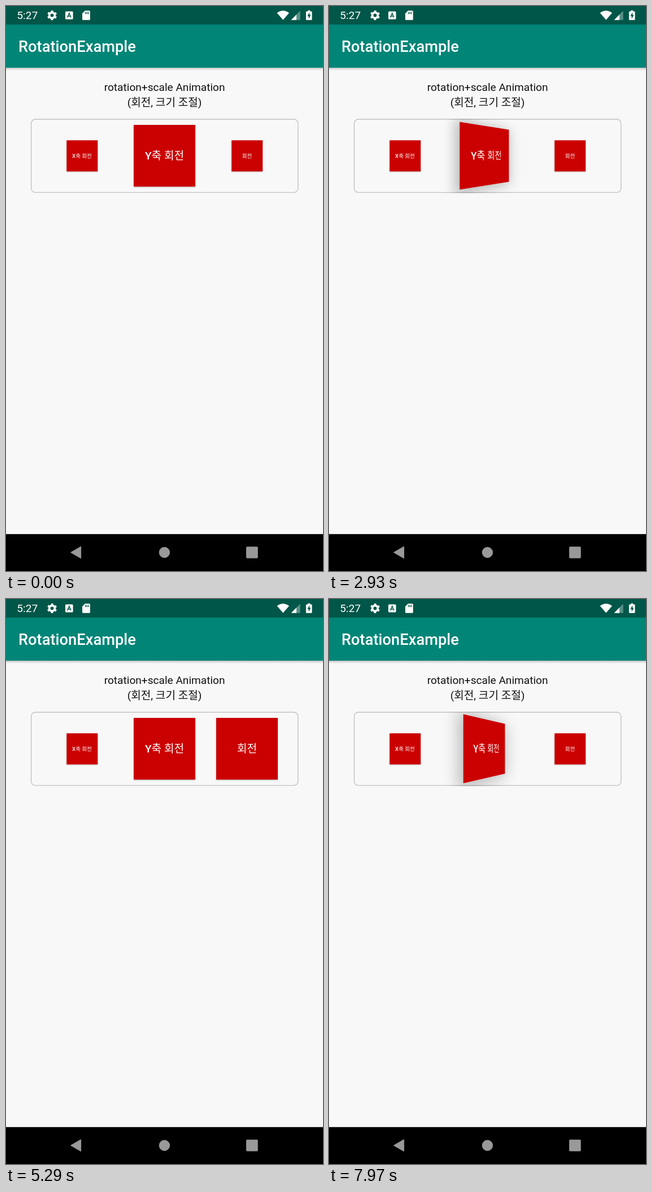
Recreate the animation shown at these times as an HTML page. Size 561 px wide and 998 px high, loop 8 s.

```html
<!DOCTYPE html>
<html lang="ko">
<head>
<meta charset="utf-8">
<title>Rotation and scale</title>
<style>
  html, body { margin: 0; width: 100%; height: 100%; overflow: hidden; background: #f8f8f8; }
  #stage { position: absolute; left: 0; top: 0; width: 561px; height: 998px; overflow: hidden; }
  #stage svg { position: absolute; display: block; }
  #field { position: absolute; left: 44px; top: 199px; width: 474px; height: 132px; overflow: hidden; }
  #field .cast { left: 0; top: 0; }
  text { font-family: Roboto, "Noto Sans CJK KR", "Noto Sans CJK", sans-serif; }
  .medium { font-weight: 500; }
  .body { font-size: 19.1px; text-anchor: middle; }
</style>
</head>
<body>
<div id="stage">
  <svg width="561" height="998" viewBox="0 0 561 998">
    <defs>
      <linearGradient id="drop" x2="0" y2="1">
        <stop offset="0" stop-opacity=".2"/>
        <stop offset="1" stop-opacity="0"/>
      </linearGradient>
    </defs>
    <rect width="561" height="998" fill="#f8f8f8"/>
    <rect y="109" width="561" height="5" fill="url(#drop)"/>
    <rect y="32" width="561" height="77" fill="#008577"/>
    <rect width="561" height="32.7" fill="#005648"/>

    <g fill="#fff">
      <text class="medium" x="22" y="81.3" font-size="27.3">RotationExample</text>
      <text x="19.3" y="23" font-size="19.1">5:27</text>
      <g fill="none" stroke="#fff">
        <circle cx="81.5" cy="16.5" r="4.8" stroke-width="3.8"/>
        <circle cx="81.5" cy="16.5" r="7.2" stroke-width="2.8" stroke-dasharray="3.6 3.94" stroke-dashoffset="-1.97"/>
      </g>
      <rect x="105" y="9.5" width="13.6" height="14" rx="1.6"/>
      <path d="M108.6 20.3l3.2-7.6 3.2 7.6M109.8 18h4" fill="none" stroke="#005648" stroke-width="1.5"/>
      <path d="M139.8 8.2h7.4q1.6 0 1.6 1.6v13.4q0 1.6-1.6 1.6h-10.6q-1.6 0-1.6-1.6v-10z"/>
      <path d="M140.6 10.5v3.8M143.2 10.5v3.8M145.8 10.5v3.8" stroke="#005648" stroke-width="1.4"/>
      <path d="M479.6 12.2q10.7-8 21.4 0l-10.7 12.4z"/>
      <path d="M504.6 24.8h16v-16.4z" opacity=".35"/>
      <path d="M504.6 24.8h9.4v-9.6z"/>
      <path d="M534.2 9.6v-1.8h4v1.8h2.3q1 0 1 1v13.2q0 1-1 1h-8.6q-1 0-1-1v-13.2q0-1 1-1z"/>
      <path d="M537.2 11.2l-4 6.6h2.4v4.8l4-6.8h-2.4z" fill="#005648"/>
    </g>

    <text class="body" x="280.6" y="150.4" fill="#111">rotation+scale Animation</text>
    <text class="body" x="280.6" y="177.2" fill="#111">(회전, 크기 조절)</text>
    <rect x="44.6" y="200" width="472.2" height="129.4" rx="7.5" fill="none" stroke="#c2c2c2" stroke-width="1.4"/>

    <rect y="932.8" width="561" height="66" fill="#000"/>
    <g fill="#999" stroke="#999" stroke-linejoin="round">
      <path d="M114.6 965.2l18-10.4v20.8z"/>
      <circle cx="280.4" cy="965.2" r="9.2"/>
      <rect x="425.6" y="955.4" width="19.6" height="19.6" rx="1"/>
    </g>
  </svg>
  <div id="field"></div>
</div>

<script>
const LOOP = 8000, DURATION = 1000;
const HALF = 54.5, CAMERA = 224.4, CENTER_Y = 65.7;

const tiles = [
  { x: 90.7, axes: [1, 0], from: 0.5, to: 1, latin: 'X', label: '축 회전' },
  { x: 236.5, axes: [0, 1], from: 1, to: 0.5, latin: 'Y', label: '축 회전' },
  { x: 382.2, axes: [1, 1], from: 0.5, to: 1, latin: '', label: '회전' }
];

// Each tap restarts one tile and puts the others back to rest.
const taps = [
  { at: 1240, tile: 0 },
  { at: 2731, tile: 1 },
  { at: 4290, tile: 2 },
  { at: 6210, tile: 0 },
  { at: 7740, tile: 1 }
];

const field = document.getElementById('field');

function build(tile) {
  const size = HALF * 2;
  field.insertAdjacentHTML('beforeend', `
    <svg class="cast" width="474" height="132"><polygon/></svg>
    <svg width="${size}" height="${size}" style="left:${tile.x - HALF}px;top:${CENTER_Y - HALF}px">
      <rect width="${size}" height="${size}" fill="#cb0000"/>
      <text class="body" x="${HALF}" y="61.2" fill="#fff"><tspan class="medium">${tile.latin}</tspan>${tile.label}</text>
    </svg>`);
  tile.face = field.lastElementChild;
  tile.cast = tile.face.previousElementSibling;
  tile.shadow = tile.cast.firstElementChild;
}

const ease = t => (1 - Math.cos(Math.PI * t)) / 2;

function project(x, y, ax, ay) {
  const depth = -x * Math.sin(ay);
  const px = x * Math.cos(ay);
  const py = y * Math.cos(ax) - depth * Math.sin(ax);
  const z = y * Math.sin(ax) + depth * Math.cos(ax);
  const k = CAMERA / (CAMERA - z);
  return { x: px * k, y: py * k, z };
}

function drawShadow(tile, scale, ax, ay) {
  const h = HALF * scale;
  const corners = [[-h, -h], [h, -h], [h, h], [-h, h]].map(([x, y]) => project(x, y, ax, ay));
  const lift = Math.max(0, ...corners.map(c => c.z));
  const drop = 1 + lift * 0.06;
  const points = corners.map(c => {
    const spread = 1 + Math.max(0, c.z) / 180;
    return `${tile.x + c.x * spread},${CENTER_Y + c.y * spread + drop}`;
  });
  tile.shadow.setAttribute('points', points.join(' '));
  tile.shadow.style.filter = `blur(${1.3 + lift * 0.34}px)`;
  tile.shadow.style.opacity = 0.25;

  // A steep tilt puts the far side below the surface, where it casts nothing.
  const steep = tile.axes[1] === 0 && Math.abs(Math.sin(ax)) > 0.85;
  const topNear = Math.sin(ax) * Math.cos(ax) < 0;
  const cut = `${CENTER_Y - 14}px`;
  tile.cast.style.clipPath = !steep ? 'none' : topNear ? `inset(0 0 ${cut} 0)` : `inset(${cut} 0 0 0)`;
}

function pose(tile, progress) {
  const scale = tile.from + (tile.to - tile.from) * progress;
  const [ax, ay] = tile.axes.map(on => on * progress * Math.PI * 2);
  tile.face.style.transform =
    `perspective(${CAMERA}px) rotateX(${ax}rad) rotateY(${ay}rad) scale(${scale})`;
  drawShadow(tile, scale, ax, ay);
}

function render(time) {
  const tap = taps.filter(t => t.at <= time).pop();
  tiles.forEach((tile, i) => {
    const active = tap && tap.tile === i;
    pose(tile, active ? ease(Math.min(1, (time - tap.at) / DURATION)) : 0);
  });
}

tiles.forEach(build);
const begin = performance.now();

function tick() {
  render((performance.now() - begin) % LOOP);
  requestAnimationFrame(tick);
}
tick();
</script>
</body>
</html>
```
